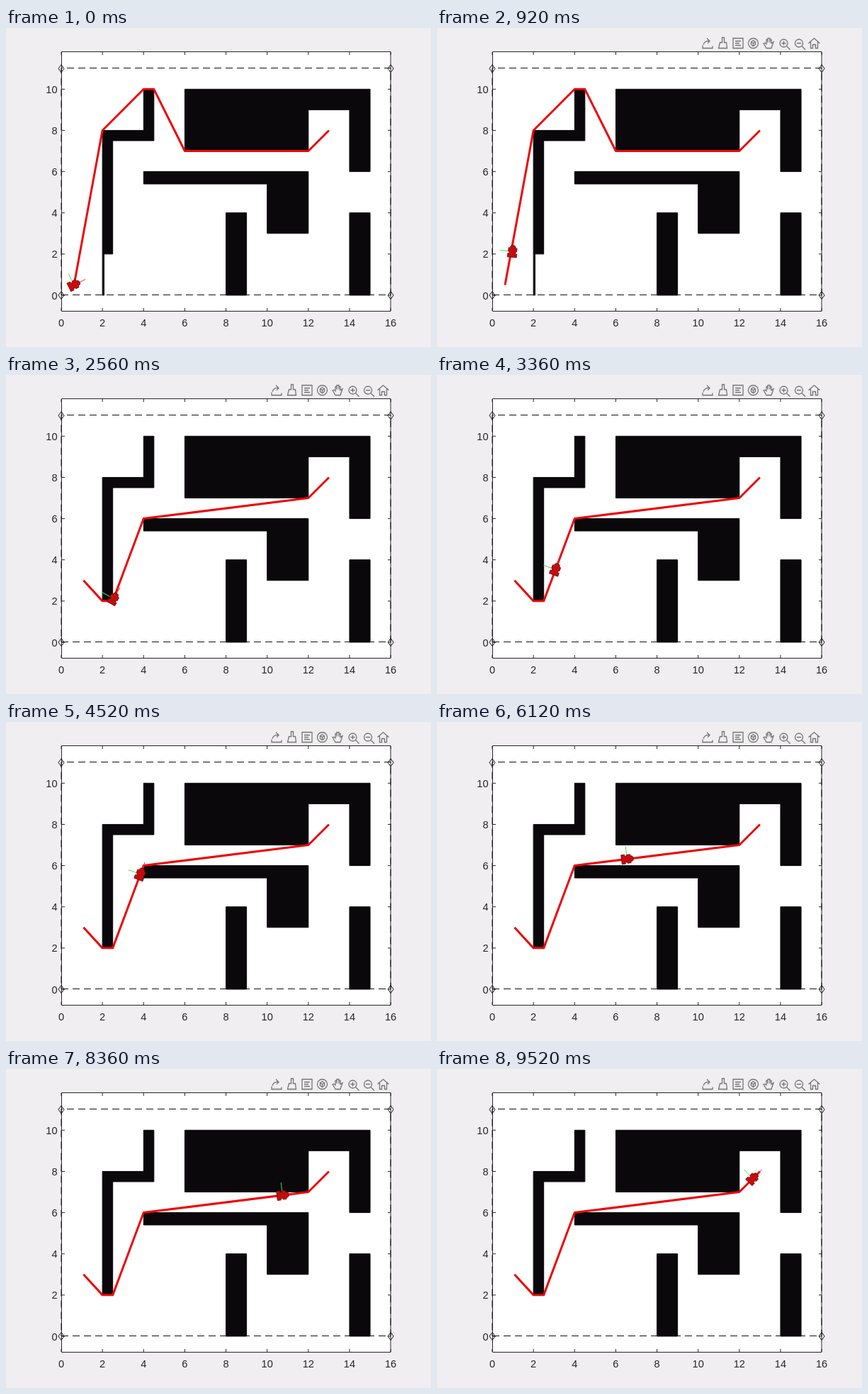
These frames come from a looping animation (600 px wide and 450 px high, 9.56 s). An HTML page:

```html
<!DOCTYPE html>
<html lang="en">
<head>
<meta charset="utf-8">
<title>Robot replanning its route</title>
<style>
  html, body { margin: 0; width: 100%; height: 100%; overflow: hidden; background: #f0eef0; }
  svg { display: block; width: 100vw; height: 100vh; }
  text { font: 14.6px "Liberation Sans", Arial, sans-serif; fill: #262626; }
  path { fill: none; vector-effect: non-scaling-stroke; }
  .axis { stroke: #262626; }
  .frame { fill: #fff; }
  .dash { stroke: #111; stroke-dasharray: 10 6; }
  .diamond { stroke: #111; }
  .wall { fill: #0a080a; stroke: #0a080a; }
  .route { stroke: #ec0608; stroke-width: 3; stroke-linejoin: round; }
  #toolbar { stroke: #747474; stroke-width: 1.3; }
  #robot .body { fill: #c40c0f; stroke: #6c070a; stroke-width: .8; }
</style>
</head>
<body>
<svg viewBox="0 0 600 450">
  <g id="axes"></g>
  <g id="map">
    <path class="wall" d="M2 2h.5v5.5h2v2.5h-.5v-2h-2z"/>
    <path class="wall" d="M6 10h9v-4h-1v3h-2v-2h-6z"/>
    <path class="wall" d="M4 6h8v-3h-2v2.4h-6z"/>
    <path class="wall" d="M8 0h1v4h-1zM14 0h1v4h-1z"/>
    <path class="wall" id="thinWall" d="M2 0h.08v2h-.08z"/>
    <path class="route" id="firstRoute"/>
    <path class="route" id="secondRoute"/>
  </g>
  <g id="toolbar"></g>
  <g id="robot">
    <path d="M0 0V-18" stroke="#4be052"/>
    <path d="M0 0H18" stroke="#d33b3b"/>
    <path class="body" d="M-8-6.5h5v2h3v-1.5h5v2q4 0 4 4t-4 4v2h-5v-1.5h-3v2h-5z"/>
  </g>
</svg>
<script>
const LOOP = 9560, STEP = 40, SPEED = 0.0549, REPLAN = 1400;
const UNIT = 29.07, LEFT = 78, BASE = 377;
const px = x => LEFT + x * UNIT;
const py = y => BASE - y * UNIT;
const byId = id => document.getElementById(id);

function add(parent, tag, attrs, text = "") {
  const node = document.createElementNS("http://www.w3.org/2000/svg", tag);
  for (const name in attrs) node.setAttribute(name, attrs[name]);
  node.textContent = text;
  byId(parent).append(node);
}
const line = (cls, d) => add("axes", "path", { class: cls, d });

line("axis frame", "M78.5 33.5H543V399.5H78.5Z");
for (let x = 0; x <= 16; x += 2) {
  line("axis", `M${px(x)} 399v-4M${px(x)} 34v4`);
  add("axes", "text", { x: px(x), y: 421, "text-anchor": "middle" }, x);
}
for (let y = 0; y <= 10; y += 2) {
  line("axis", `M79 ${py(y)}h4M543 ${py(y)}h-4`);
  add("axes", "text", { x: 72.5, y: py(y) + 5.5, "text-anchor": "end" }, y);
}
line("dash", "M78 376.5H543V56.5H78Z");
for (const x of [0, 16])
  for (const y of [0, 11])
    line("diamond", `M${px(x)} ${py(y) - 5.5}l4 5.5l-4 5.5l-4-5.5Z`);

// Toolbar icons, each centred on its own origin
const ring = r => `M${-r} 0a${r} ${r} 0 1 0 ${2 * r} 0a${r} ${r} 0 1 0 ${-2 * r} 0`;
const lens = ring(5.5) + "M4 4l5 5M-3 0h6";
const icons = {
  share: "M-7 3v4h14v-3M-6 2q2-6 8-5M-1-7l4 4l-3 3",
  brush: "M-1-8h3v7h3l1 8h-12l2-8h3z",
  tips: "M-7-7h14v14h-14zM-4-3h8M-4 0h6M-4 3h8",
  rotate: ring(7) + "M-3-2l3-2l3 2v4l-3 2l-3-2zl3 2l3-2M0 0v4",
  pan: "M-3 7l-4-7q2-1 4 1v-6h2v4v-6h3v6v-4h2v5l3-2l-3 9z",
  zoomIn: lens + "M0-3v6",
  zoomOut: lens,
  home: "M-8 0l8-7l8 7M-5-2v9h3v-5h4v5h3v-9"
};
Object.values(icons).forEach((d, i) =>
  add("toolbar", "path", { d, transform: `translate(${382 + 21.5 * i} 21.5)` }));

// Routes in plot units
const home = [.62, .5], replanAt = [1.08, 3], goal = [[12, 7], [13, 8]];
const firstRoute = [home, [2, 8], [4, 10], [4.5, 10], [6, 7], ...goal];
const secondRoute = [replanAt, [2, 2], [2.5, 2], [4, 6], ...goal];
byId("map").setAttribute("transform", `translate(${LEFT} ${BASE}) scale(${UNIT} ${-UNIT})`);
byId("firstRoute").setAttribute("d", "M" + firstRoute.join("L"));
byId("secondRoute").setAttribute("d", "M" + secondRoute.join("L"));

// The robot swings onto each route through a short turn
const startTurn = [[.76, .55], [.83, .75]];
const uTurn = [[1.2, 3.12], [1.35, 3.06], [1.45, 2.72]];
const track = [home, ...startTurn, replanAt, ...uTurn, ...secondRoute.slice(1)]
  .map(([x, y]) => [px(x), py(y)]);

function pointAt(distance) {
  let rest = Math.max(0, distance);
  for (let i = 1; i < track.length; i++) {
    const [x, y] = track[i - 1], dx = track[i][0] - x, dy = track[i][1] - y;
    const length = Math.hypot(dx, dy);
    if (rest <= length || i === track.length - 1)
      return [x + dx * rest / length, y + dy * rest / length];
    rest -= length;
  }
}

const show = (id, on) => byId(id).style.display = on ? "" : "none";

function draw(time) {
  const t = Math.floor(time % LOOP / STEP) * STEP;
  const distance = t * SPEED;
  const [x, y] = pointAt(distance);
  const [x0, y0] = pointAt(distance - 5), [x1, y1] = pointAt(distance + 5);
  const heading = Math.atan2(y1 - y0, x1 - x0) * 180 / Math.PI;
  byId("robot").setAttribute("transform", `translate(${x} ${y}) rotate(${heading})`);
  show("toolbar", t >= STEP);
  show("firstRoute", t < REPLAN);
  show("thinWall", t < REPLAN);
  show("secondRoute", t >= REPLAN);
}

const start = performance.now();
function tick() {
  draw(performance.now() - start);
  requestAnimationFrame(tick);
}
tick();
</script>
</body>
</html>
```
